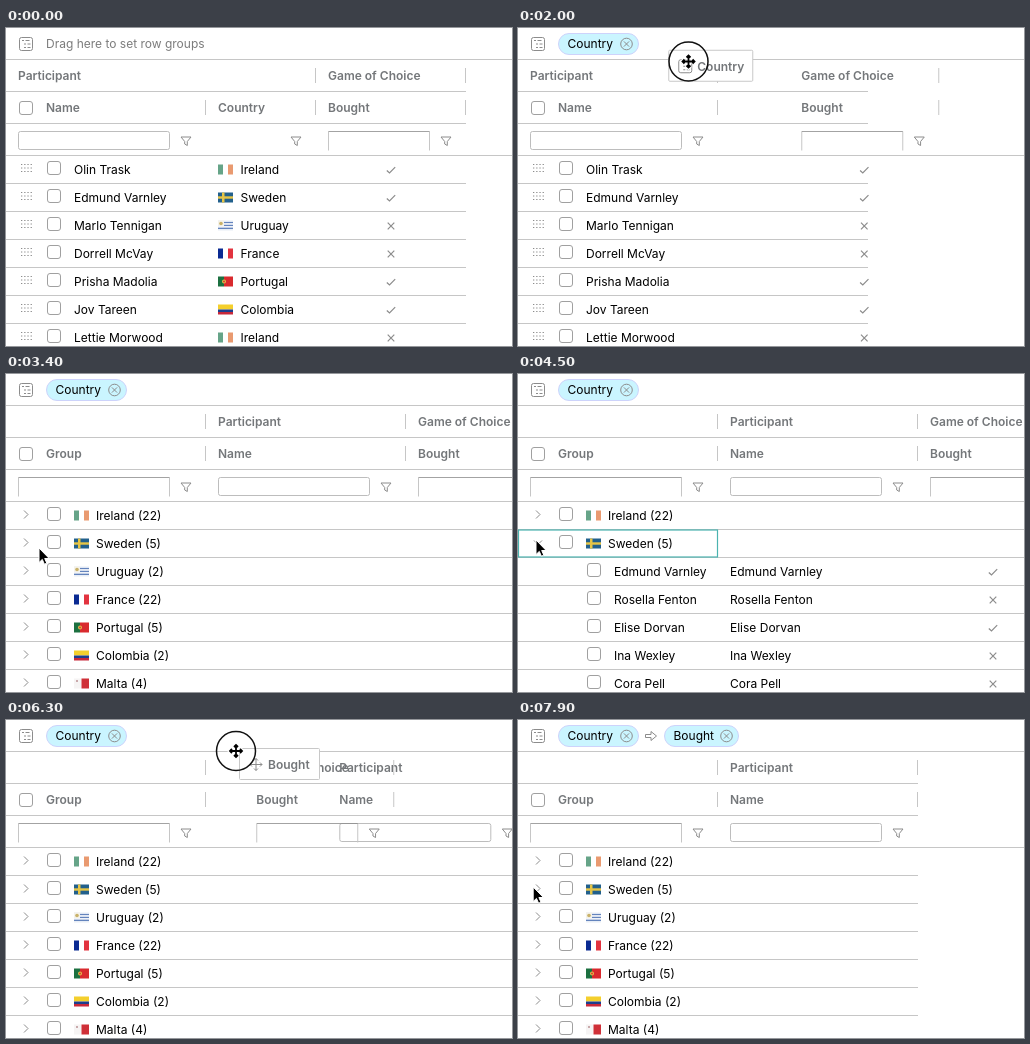
Recreate the animation shown at these times as an HTML page. Size 506x318 px, loop 8000 ms.

```html
<!DOCTYPE html>
<html lang="en">
<head>
<meta charset="utf-8">
<title>Row grouping</title>
<style>
html, body { margin: 0; width: 100%; height: 100%; overflow: hidden; background: #fff; }
svg { display: block; width: 506px; height: 318px; font: 12px Inter, "Open Sans", sans-serif; }
.head { font-weight: 600; fill: #74777a; }
.hint { fill: #7c7c7c; }
.line { stroke: #c6c6c6; fill: none; }
.icon { stroke: #8c8c8c; fill: none; }
</style>
</head>
<body>
<svg id="stage" viewBox="0 0 506 318" xmlns="http://www.w3.org/2000/svg"></svg>
<script>
const LOOP = 8000, ROW = 28, TOP = 128;
const AT = {
  inPanel: 1900, grouped: 2800, open: 3900, close: 4900,
  swap: 6084, inPanel2: 6390
};
const presses = [[1100, 2600], [3900, 4050], [4850, 5000], [5650, 6900]];
const drags = [
  { label: 'Country', from: 1400, to: 2600, width: 84, panel: AT.inPanel },
  { label: 'Bought', from: 5850, to: 6900, width: 80, panel: AT.inPanel2 }
];
// time, x, y, eased arrival
const path = [
  [200, 300, 320], [950, 226, 78, 1], [1200, 225, 73], [1350, 224, 71], [1800, 190, 42],
  [2200, 151, 25], [2300, 151, 17], [2700, 151, 17], [3400, 33, 174, 1], [3800, 18, 166, 1],
  [4950, 18, 166], [5550, 430, 78, 1], [5700, 430, 78], [6200, 263, 44], [6300, 230, 31],
  [6400, 222, 27], [6500, 218, 24], [6700, 202, 17], [6950, 202, 17], [7450, 16, 167, 1],
  [8000, 15, 167]
];

const people = [
  ['Olin Trask', 'Ireland', 1], ['Edmund Varnley', 'Sweden', 1], ['Marlo Tennigan', 'Uruguay', 0],
  ['Dorrell McVay', 'France', 0], ['Prisha Madolia', 'Portugal', 1], ['Jov Tareen', 'Colombia', 1],
  ['Lettie Morwood', 'Ireland', 0]
];
const groups = [
  ['Ireland', 22], ['Sweden', 5], ['Uruguay', 2], ['France', 22],
  ['Portugal', 5], ['Colombia', 2], ['Malta', 4]
];
const members = [
  ['Edmund Varnley', 1], ['Rosella Fenton', 0], ['Elise Dorvan', 1], ['Ina Wexley', 0], ['Cora Pell', 0]
];

const ramp = (t, a, b) => Math.min(1, Math.max(0, (t - a) / (b - a)));
const smooth = p => p * p * (3 - 2 * p);
const glide = (t, a, b) => smooth(ramp(t, a, b));
const lerp = (a, b, p) => a + (b - a) * p;

const rect = (x, y, w, h, fill) => `<rect x="${x}" y="${y}" width="${w}" height="${h}" fill="${fill}"/>`;
const text = (x, y, s, cls = '') => `<text x="${x}" y="${y}" class="${cls}">${s}</text>`;
const draw = (x, y, d, cls = 'icon', extra = '') =>
  `<path transform="translate(${x} ${y})" d="${d}" class="${cls}" ${extra}/>`;
const hline = (y, w) => draw(0, y + .5, `M0 0H${w}`, 'line');
const sep = (x, y) => draw(x - .5, y, 'M0 0V15', 'line');
const checkbox = (x, y) =>
  `<rect x="${x + .5}" y="${y + .5}" width="13" height="13" rx="2.5" fill="#fff" stroke="#a0a0a0"/>`;

const MOVE = 'M-6 0H6M0-6V6M-4-2L-6 0L-4 2M4-2L6 0L4 2M-2-4L0-6L2-4M-2 4L0 6L2 4';
const LIST = 'M-4.5-6.5h9q2 0 2 2v9q0 2-2 2h-9q-2 0-2-2v-9q0-2 2-2zM-4-3.5h2M-.5-3.5h4M-2 0h2M1.5 0h3M-2 3.5h2M1.5 3.5h3';
const FUNNEL = 'M-5-4.5H5L1.3 0V4L-1.3 2.5V0Z';
const ARROW = 'M0 0V14.5L3.3 11.4L5.4 16.2L7.8 15.2L5.7 10.5H10.2Z';

function stripes(colors, across) {
  const n = colors.length;
  return colors.map((c, i) => across
    ? rect(0, i * 10 / n, 15, 10 / n, c)
    : rect(i * 15 / n, 0, 15 / n, 10, c)).join('');
}
const flags = {
  Ireland: stripes(['#66a488', '#fff', '#e99a70']),
  Sweden: rect(0, 0, 15, 10, '#22608c') + rect(4, 0, 2.5, 10, '#e6c546') + rect(0, 3.8, 15, 2.4, '#e6c546'),
  Uruguay: stripes(['#e8eef6', '#6484bd', '#f4f6fa', '#6484bd', '#f4f6fa', '#6484bd', '#e8eef6'], true) +
    rect(0, 0, 6, 5.7, '#f4f2ea') + '<circle cx="3" cy="3" r="1.8" fill="#c9b26a"/>',
  France: stripes(['#0a2a92', '#fff', '#e2333f']),
  Portugal: rect(0, 0, 6, 10, '#1c7040') + rect(6, 0, 9, 10, '#d92a2e') +
    '<circle cx="6" cy="5" r="2" fill="#e4c24a"/><circle cx="6" cy="5" r=".9" fill="#d92a2e"/>',
  Colombia: rect(0, 0, 15, 5, '#f4cf2d') + rect(0, 5, 15, 2.5, '#1d3f8f') + rect(0, 7.5, 15, 2.5, '#c8283a'),
  Malta: rect(0, 0, 7.5, 10, '#f6f4f4') + rect(7.5, 0, 7.5, 10, '#cf3038') + rect(2, 1.5, 2, 2, '#c9a9ab')
};
const flag = (name, x, y) => `<g transform="translate(${x} ${y})">${flags[name]}</g>`;
const mark = (yes, x, y) => yes
  ? draw(x, y, 'M-4.2 .5L-1.5 3L4.2-2.8', 'icon', 'stroke-width="1.2"')
  : draw(x, y, 'M-3.3-3.3L3.3 3.3M3.3-3.3L-3.3 3.3', 'icon', 'stroke-width="1.2"');

function grip(y) {
  let d = '';
  for (let r = 0; r < 3; r++) for (let c = 0; c < 4; c++) d += `M${15 + c * 3.2} ${y + 8.5 + r * 3.5}h1.3`;
  return draw(0, 0, d);
}

function filterBox(x, w, editable) {
  const right = w - 48;
  return editable
    ? `<rect x="${x + 12.5}" y="103.5" width="${right - 1}" height="18" rx="2" fill="#fff" stroke="#bdbdbd"/>`
    : draw(x + 12.5, 103.5, `M0 19V0M${right - 1} 0V19`, 'line') +
      draw(x + 12.5, 103.5, `M0 0H${right - 1}`, 'icon', 'stroke-opacity=".8"');
}

function column(c) {
  const end = c.x + c.w;
  return (c.boxed ? checkbox(13, 73) : '') +
    text(c.x + (c.boxed ? 40 : 12), 84, c.label, 'head') + sep(end, 72) +
    (c.filter ? filterBox(c.x, c.w, c.filter === 'edit') : '') +
    draw(end - 20, 113.5, FUNNEL);
}

const band = (x, w, label) => text(x + 12, 52, label, 'head') + sep(x + w, 40);

function pill(x, w, label) {
  return `<rect x="${x + .5}" y="5.5" width="${w - 1}" height="21" rx="10.5" fill="#caf5ff" stroke="#cdd3fb"/>` +
    text(x + 9.5, 20, label) +
    `<circle cx="${x + w - 12.5}" cy="16" r="5.8" class="icon"/>` +
    draw(x + w - 12.5, 16, 'M-2.6-2.6L2.6 2.6M2.6-2.6L-2.6 2.6');
}

function layout(t) {
  const grouped = t >= AT.grouped;
  const name = { label: 'Name', x: 0, w: 200, filter: 'edit', boxed: !grouped };
  const bought = { label: 'Bought', w: 150, filter: 'set' };
  if (!grouped) {
    const hasCountry = t < AT.inPanel;
    bought.x = lerp(310, 200, glide(t, AT.inPanel, AT.inPanel + 250));
    const country = { label: 'Country', x: 200, w: 110 };
    return { grouped, hasCountry, name, bought, width: hasCountry ? 460 : 350,
      cols: hasCountry ? [name, country, bought] : [name, bought] };
  }
  const slide = glide(t, AT.grouped, AT.grouped + 250);
  const swap = glide(t, AT.swap, AT.swap + 300);
  const back = glide(t, AT.inPanel2, 6500);
  name.x = 200 * slide + 150 * (swap - back);
  bought.x = 200 + 200 * slide - 200 * swap;
  const group = { label: 'Group', x: 0, w: 200, filter: 'set', boxed: true };
  const hasBought = t < AT.inPanel2;
  return { grouped, name, bought, hasBought, width: hasBought ? 506 : 400,
    cols: hasBought ? [group, name, bought] : [group, name] };
}

function header(t, L) {
  let s = draw(20, 16, LIST);
  if (t < AT.inPanel) s += text(40, 20, 'Drag here to set row groups', 'hint');
  else s += pill(40, 81, 'Country');
  if (t >= AT.inPanel2) s += draw(133, 16, 'M-5.5-1.5H0V-4.5L5.5 0L0 4.5V1.5H-5.5Z') + pill(146, 75, 'Bought');
  s += hline(31, 506) + hline(63, L.width) + hline(95, L.width) + hline(127, 506);
  if (L.grouped) s += sep(200, 40);
  s += band(L.name.x, L.hasCountry ? 310 : 200, 'Participant');
  if (!L.grouped || L.hasBought) s += band(L.bought.x, 150, 'Game of Choice');
  return s + L.cols.map(column).join('');
}

function flatRows(L) {
  return people.map(([who, country, yes], i) => {
    const y = TOP + i * ROW;
    return grip(y) + checkbox(41, y + 5) + text(68, y + 18, who) +
      (L.hasCountry ? flag(country, 212, y + 8.5) + text(234.5, y + 18, country) : '') +
      mark(yes, L.bought.x + 75, y + 14) + hline(y + 27, L.width);
  }).join('');
}

function groupRows(t, L) {
  const isOpen = t >= AT.open && t < AT.close;
  const spread = glide(t, AT.open, AT.open + 350) - glide(t, AT.close, AT.close + 350);
  let s = '';
  if (spread > 0) {
    s += `<g opacity="${spread}">` + members.map(([who, yes], i) => {
      const y = TOP + (i + 2) * ROW;
      return checkbox(69, y + 5) + text(96, y + 18, who) + text(L.name.x + 12, y + 18, who) +
        mark(yes, L.bought.x + 75, y + 14) + hline(y + 27, L.width);
    }).join('') + '</g>';
  }
  groups.forEach(([country, count], i) => {
    const y = TOP + i * ROW + (i > 1 ? spread * members.length * ROW : 0);
    const chevron = i === 1 && isOpen ? 'M-4-2L0 2L4-2' : 'M-2-4L2 0L-2 4';
    s += rect(0, y, L.width, 27, '#fff') + draw(20, y + 12.5, chevron) + checkbox(41, y + 5) +
      flag(country, 68, y + 8.5) + text(90, y + 18, `${country} (${count})`) + hline(y + 27, L.width);
  });
  if (t >= AT.open && t < 5700)
    s += '<rect x=".5" y="156" width="199" height="27" fill="none" stroke="#4bb3b0" stroke-width="1.2"/>';
  return s;
}

function pointAt(t) {
  const i = path.findIndex(k => k[0] > t);
  if (i < 1) return path[i < 0 ? path.length - 1 : 0].slice(1, 3);
  const [a, b] = [path[i - 1], path[i]];
  const p = ramp(t, a[0], b[0]), q = b[3] ? smooth(p) : p;
  return [lerp(a[1], b[1], q), lerp(a[2], b[2], q)];
}

function pointer(t) {
  if (t < path[0][0]) return '';
  const [x, y] = pointAt(t);
  const drag = drags.find(d => t >= d.from && t < d.to);
  const press = presses.find(p => t >= p[0] && t < p[1]);
  let s = '';
  if (drag) {
    // the dragged label trails the pointer slightly
    const [lx, ly] = pointAt(t - 100);
    const gx = lx - 30, gy = ly - 16;
    s += `<rect x="${gx + .5}" y="${gy + .5}" width="${drag.width}" height="31" rx="1" fill="#fff" stroke="#c8c8c8"/>` +
      draw(gx + 17, gy + 16.5, t >= drag.panel ? LIST : MOVE) + text(gx + 29, gy + 21, drag.label, 'head');
  }
  if (press) {
    const r = 19.5 + 4 * (1 - ramp(t, press[0], press[0] + 200));
    s += `<circle cx="${x}" cy="${y}" r="${r}" fill="none" stroke="#111" stroke-width="1.5"/>`;
  }
  return s + (drag
    ? draw(x, y, MOVE, '', 'fill="none" stroke="#fff" stroke-width="4"') +
      draw(x, y, MOVE, '', 'fill="none" stroke="#000" stroke-width="1.8"')
    : draw(x, y, ARROW, '', 'fill="#000" stroke="#fff"'));
}

const stage = document.getElementById('stage');
let shown = '';
function render(t) {
  const L = layout(t);
  const scene = rect(0, 0, 506, 318, '#fff') +
    (L.grouped ? groupRows(t, L) : flatRows(L)) + header(t, L) + pointer(t);
  if (scene !== shown) stage.innerHTML = shown = scene;
}

const start = performance.now();
function tick() {
  // ten steps a second, like a screen recording
  render(Math.floor((performance.now() - start) % LOOP / 100) * 100);
  requestAnimationFrame(tick);
}
tick();
</script>
</body>
</html>
```
